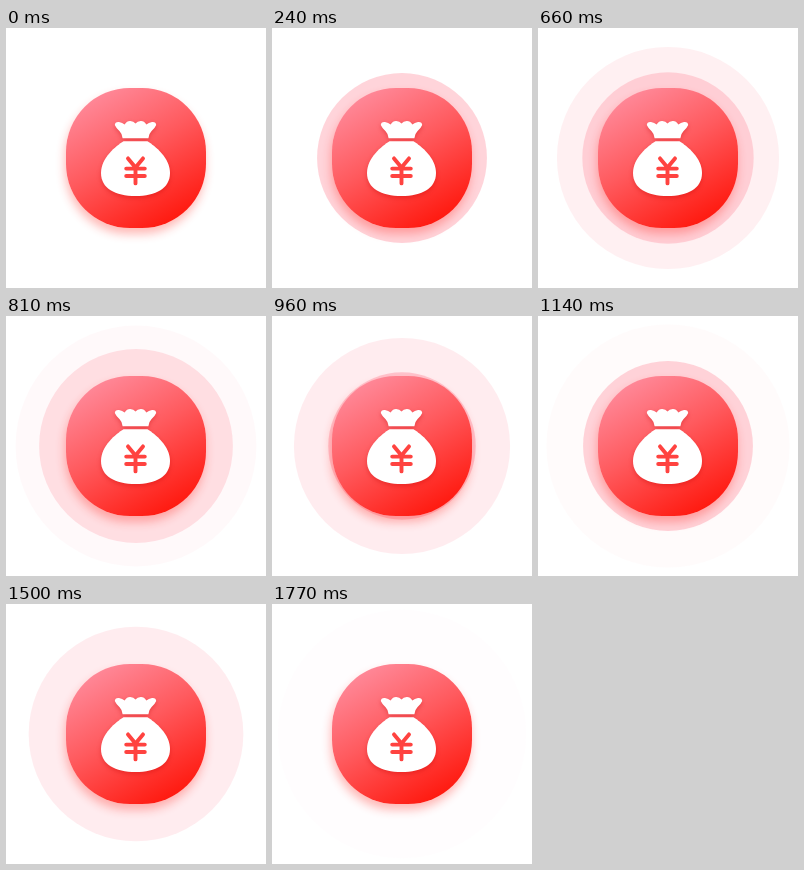
These frames come from a looping animation (260 px wide and 260 px high, 1800 ms). An HTML page:

```html
<!DOCTYPE html>
<html lang="en">
<head>
<meta charset="utf-8">
<title>Pulsing money bag</title>
<style>
  html, body { margin: 0; width: 100%; height: 100%; overflow: hidden; background: #fff; }
  svg { position: absolute; left: 0; top: 0; width: 260px; height: 260px; }
  .button {
    position: absolute; left: 60px; top: 60px; width: 140px; height: 140px;
    border-radius: 64px;
    background: linear-gradient(150deg, #ff90a2 5%, #ff5a5e 46%, #ff1a10 88%);
    box-shadow: -1px 6px 10px rgba(255, 40, 30, .32);
  }
  .bag { filter: drop-shadow(0 2px 2px rgba(190, 0, 0, .32)); }
</style>
</head>
<body>
<svg viewBox="0 0 260 260" fill="#ffb6c1">
  <circle class="ring" cx="130" cy="130" r="70"/>
  <circle class="ring" cx="130" cy="130" r="70"/>
  <circle class="ring" cx="130" cy="130" r="70"/>
</svg>
<div class="button"></div>
<svg viewBox="0 0 260 260">
  <g class="bag" fill="#fff">
    <path d="M108.8 97 Q109 93.6 113 94 Q116.5 94.6 118.6 96.4 Q121 92.8 124.3 93 Q127.6 93.2 129.5 95.6
             Q131.4 93.2 134.7 93 Q138 92.8 140.4 96.4 Q142.5 94.6 146 94 Q150 93.6 150.2 97
             Q149 100 145.4 103.2 Q142.6 106 142.4 110.2 H116.6 Q116.4 106 113.6 103.2 Q110 100 108.8 97Z"/>
    <path d="M117.5 113.2 H141.5 C149 118 164 129.5 164 145 C164 160.4 150 168 129.5 168
             C109 168 95 160.4 95 145 C95 129.5 110 118 117.5 113.2Z"/>
  </g>
  <path d="M122 130.4 L129.5 139.5 L137 130.4 M129.5 139.5 V155.4 M120.2 140.6 H138.8 M120.2 148 H138.8"
        fill="none" stroke="#ff4340" stroke-width="3.9" stroke-linecap="round" stroke-linejoin="round"/>
</svg>
<script>
  const LOOP = 1800, STEP = 30;
  const pulses = [
    { start: 0, span: 900 },
    { start: 450, span: 750 },
    { start: 900, span: 900 }
  ];
  const rings = document.querySelectorAll('.ring');

  function draw() {
    const t = Math.floor((performance.now() % LOOP) / STEP) * STEP;
    pulses.forEach(({ start, span }, i) => {
      const p = (t - start) / span;
      const on = p >= 0 && p < 1;
      rings[i].setAttribute('r', on ? 70 * (1 + .8 * p) : 70);
      rings[i].setAttribute('opacity', on ? .8 * (1 - p) : 0);
    });
    requestAnimationFrame(draw);
  }
  draw();
</script>
</body>
</html>
```
